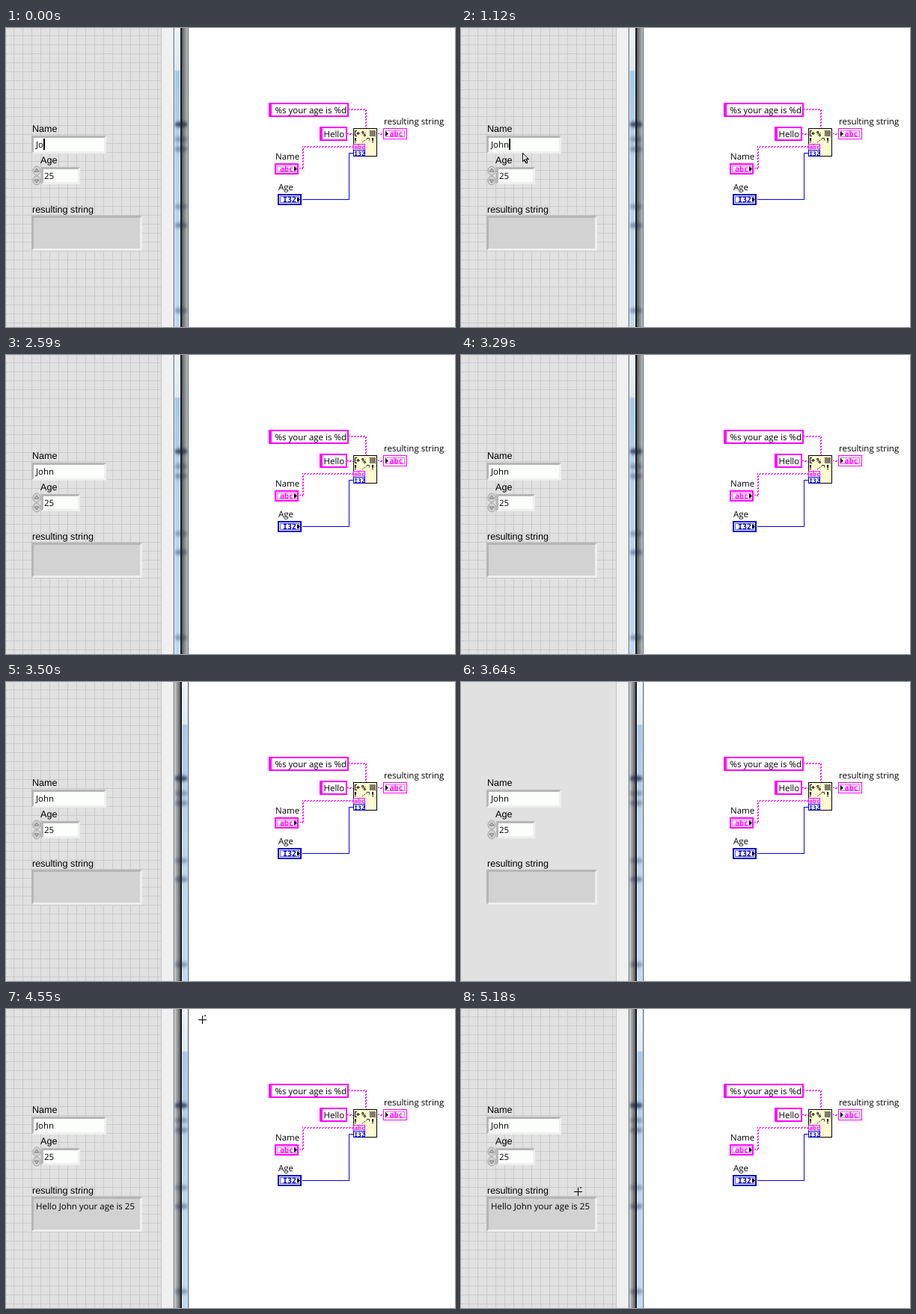
These frames come from a looping animation (600x400 px, 5880 ms). An HTML page:

```html
<!DOCTYPE html>
<html lang="en">
<head>
<meta charset="utf-8">
<title>Format into string</title>
<style>
html, body { margin: 0; width: 100%; height: 100%; overflow: hidden; background: #fff; }
svg { display: block; width: 600px; height: 400px; }
text { font: 11.5px "Open Sans", "Noto Sans", sans-serif; fill: #000; white-space: pre; text-rendering: geometricPrecision; }
.label { font: 12.6px "Liberation Sans", Arial, sans-serif; }
.type { font: bold 10px "DejaVu Sans Mono", monospace; }
.mini { font: bold 8px "DejaVu Sans Mono", monospace; }
.str { fill: #f0f; }
.int { fill: #0000c8; }
.crisp { shape-rendering: crispEdges; }
</style>
</head>
<body>
<svg id="stage" viewBox="0 0 600 400">
  <defs>
    <pattern id="grid" x="10" y="10" width="12" height="12" patternUnits="userSpaceOnUse">
      <path d="M0 .5H12M.5 0V12" stroke="#c9c9c9"/>
    </pattern>
    <linearGradient id="glass" x2="0" y2="1">
      <stop offset="0" stop-color="#eef4fa"/><stop offset=".14" stop-color="#dce8f3"/>
      <stop offset=".145" stop-color="#a6c8ea"/><stop offset=".5" stop-color="#b7d5f1"/>
      <stop offset="1" stop-color="#bfdaf4"/>
    </linearGradient>
    <linearGradient id="shadow">
      <stop offset="0" stop-opacity=".6"/><stop offset=".6" stop-opacity=".25"/><stop offset="1" stop-opacity="0"/>
    </linearGradient>
    <filter id="blur" x="-50%" y="-100%" width="200%" height="300%"><feGaussianBlur stdDeviation="1 2"/></filter>
    <clipPath id="frame"><rect x="225" y="0" width="18" height="400"/></clipPath>
  </defs>
  <rect width="600" height="400" fill="#fff"/>
  <g id="panel"></g>
  <g id="edge"></g>
  <g id="diagram"></g>
  <rect id="caret" class="crisp" width="2" height="15"/>
  <path id="arrow" class="crisp" d="M.5 .5V11.5L3 9.2 5 13.8 7 13 5 8.4H8.3Z" fill="#fff" stroke="#000" stroke-width="1.3"/>
  <path id="beam" class="crisp" d="M-3 .5H0M1 .5H4M.5 1V14M-3 14.5H0M1 14.5H4" stroke="#000"/>
  <g id="cross" class="crisp">
    <path d="M-5 .5H6M.5 -5V6" stroke="#000"/>
    <rect x="3" y="-6" width="2" height="2" fill="#555"/>
  </g>
</svg>
<script>
const LOOP = 5880;
const $ = id => document.getElementById(id);

const rect = (x, y, w, h, fill, extra = '') =>
  `<rect class="crisp" x="${x}" y="${y}" width="${w}" height="${h}" fill="${fill}" ${extra}/>`;
const text = (x, y, s, cls = '', id = '') =>
  `<text x="${x}" y="${y}" class="${cls}" id="${id}">${s}</text>`;
const path = (d, fill, stroke = 'none') => `<path d="${d}" fill="${fill}" stroke="${stroke}"/>`;

// Sunken control: dark upper left rim, light lower right rim
function field(x, y, w, h, fill) {
  return rect(x, y, w, h, '#efefef') +
    path(`M${x} ${y}h${w}l-3 3H${x + 3}V${y + h - 3}L${x} ${y + h}Z`, '#b6b6b6') +
    rect(x + 3, y + 3, w - 6, h - 6, fill);
}

function spinner(x, y) {
  const half = (top, tip) =>
    `<ellipse cx="${x + 6}" cy="${top + 6}" rx="5" ry="6" fill="#d2d2d2" stroke="#a2a2a2"/>` +
    path(`M${x + 3} ${top + 6 - tip}h6l-3 ${tip * 4}Z`, '#c4c4c4', '#777');
  return half(y, -1) + half(y + 13, 1);
}

function stringBox(x, y, w, h) {
  return rect(x, y, w, h, '#f0f') + rect(x + 4, y + 2, w - 6, h - 4, '#fff');
}

function terminal(x, y, color, thick, label, cls, out) {
  const w = 32, h = 15, p = out ? x + 3 : x + 26;
  return rect(x, y, w, h, color) + rect(x + thick, y + thick, w - 2 * thick, h - 2 * thick, '#fff') +
    rect(x + 3.5, y + 3.5, w - 7, h - 7, '#fff', `stroke="${color}" stroke-opacity=".65"`) +
    text(x + (out ? 8.5 : 7), y + 11, label, 'type ' + cls) +
    path(`M${p} ${y + 4}v7l4 -3.5Z`, '#000');
}

function stringWire(d) {
  return `<g class="crisp" fill="none" stroke="#f0f" stroke-dasharray="2 2"><path d="${d}"/>` +
    `<path d="${d}" stroke-dashoffset="2" transform="translate(1 1)"/></g>`;
}

function formatNode() {
  let dots = '';
  for (let i = 0; i < 32; i++) {
    dots += rect(486 + i % 4 * 2 + (i >> 2) % 2, 137 + (i >> 2), 1, 1, '#000');
  }
  const bang = x => rect(x, 147, 2, 4, '#000') + rect(x, 152, 2, 1, '#000');
  return rect(464.5, 134.5, 31, 37, '#fffbd0', 'stroke="#000"') +
    path('M469 137.5H466.5V144.5H469M468 141H473M470.5 139V143', 'none', '#000') +
    text(475, 145, '%', 'type') + dots + bang(466) + bang(489) +
    '<path d="M476 153l8 -6" stroke="#333" stroke-dasharray="2 1"/>' + path('M482 147.5h3.5v3', 'none', '#333') +
    rect(464.5, 155.5, 15, 8, '#fff', 'stroke="#f0f"') + text(465.3, 162, 'abc', 'mini str') +
    rect(464.5, 163.5, 15, 8, '#fff', 'stroke="#0000c8"') + text(465.3, 170.5, 'I32', 'mini int');
}

$('panel').innerHTML = rect(0, 0, 208, 400, '#e1e1e1') +
  '<rect id="lines" width="208" height="400" fill="url(#grid)"/>' +
  text(35, 139, 'Name', 'label') + text(46, 181, 'Age', 'label') + text(35, 247, 'resulting string', 'label') +
  field(34, 144, 100, 24, '#fbfefb') + field(47, 186, 52, 23, '#fbfefb') +
  field(34, 251, 148, 47, '#d2d2d2') + spinner(35, 185) +
  text(40, 160, '', '', 'name') + text(51, 202, '25') + text(40, 268, '', '', 'result') +
  rect(207, 0, 1, 400, '#c4c4c4') + rect(208, 0, 15, 400, '#f0f0f0');

// The active window has blue glass and drops its shadow on the other frame
const glass = x => rect(x, 0, 8, 400, 'url(#glass)') +
  rect(x, 0, 1, 400, '#fff', 'opacity=".55"') + rect(x + 7, 0, 1, 400, '#fff', 'opacity=".55"');

const smudges = [[129, .85], [149, .35], [162, .4], [239, .35], [264, .45], [378, .4]]
  .map(([y, o]) => `<ellipse cx="234" cy="${y}" rx="9" ry="3.5" fill="#1c2f4c" opacity="${o}" filter="url(#blur)"/>`)
  .join('');

$('edge').innerHTML = rect(223, 0, 1, 400, '#d8d8d8') +
  '<g id="before">' + rect(224, 0, 1, 400, '#707880') + glass(225) +
  rect(235, 0, 8, 400, '#e2e7ec') + rect(243, 0, 1, 400, '#8a8f94') +
  rect(235, 0, 11, 400, 'url(#shadow)') + '</g>' +
  '<g id="after">' + rect(224, 0, 1, 400, '#80858a') + rect(225, 0, 8, 400, '#e2e7ec') +
  `<g transform="matrix(-1 0 0 1 233 0)">${rect(0, 0, 9, 400, 'url(#shadow)')}</g>` +
  glass(235) + rect(243, 0, 1, 400, '#505860') + '</g>' +
  `<g clip-path="url(#frame)">${smudges}</g>` + rect(233, 0, 2, 400, '#1a1a1a');

$('diagram').innerHTML =
  stringWire('M458 108.5H480.5V134') + stringWire('M456 141.5H464') +
  stringWire('M392 187.5H396.5V158.5H464') + stringWire('M497 141.5H505') +
  '<path class="crisp" d="M396 229.5H458.5V167.5H464" fill="none" stroke="#00f"/>' +
  stringBox(351, 100, 107, 19) + text(359.5, 114, '%s your age is %d') +
  stringBox(419, 132, 37, 19) + text(424.5, 146, 'Hello') +
  text(360, 176, 'Name') + terminal(359, 181, '#f0f', 2, 'abc', 'str') +
  text(364, 217, 'Age') + terminal(363, 222, '#0000c8', 2, 'I32', 'int') +
  text(505, 129, 'resulting string') + terminal(504, 134, '#f0f', 1, 'abc', 'str', true) +
  formatNode();

// Pointer stops: [time, x, y]; a stop without a place hides the pointer
const arrowStops = [[1120, 82, 167], [1190, 79, 180], [1260], [1820, 73, 210], [1890, 77, 232],
  [1960, 81, 254], [2030, 84, 268], [2380, 98, 222], [2450, 118, 160], [2520, 133, 100], [2590]];
const beamStops = [[1260, 78, 193], [1470]];
const crossStops = [[4550, 262, 14], [4620, 258, 70], [4690, 248, 146], [4760, 234, 219],
  [4830, 220, 271], [4970, 203, 267], [5040, 183, 258], [5110, 166, 249], [5180, 156, 244]];
const caretStops = [[0, 50, 148], [210, 57, 148], [420, 64, 148], [1260], [1470, 62, 190],
  [2450], [2870, 62, 190], [3290]];

const show = (id, on) => $(id).setAttribute('visibility', on ? 'visible' : 'hidden');

function place(id, stops, t) {
  const stop = stops.filter(s => s[0] <= t).pop();
  const on = !!stop && stop.length > 1;
  show(id, on);
  if (on) $(id).setAttribute('transform', `translate(${stop[1]} ${stop[2]})`);
}

function draw(t) {
  $('name').textContent = 'John'.slice(0, t < 210 ? 2 : t < 420 ? 3 : 4);
  $('result').textContent = t < 3710 ? '' : 'Hello John your age is 25';
  show('lines', t < 3640 || t >= 3710);
  show('before', t < 3500);
  show('after', t >= 3500);
  place('caret', caretStops, t);
  place('arrow', arrowStops, t);
  place('beam', beamStops, t);
  place('cross', crossStops, t);
}

const start = performance.now();
function tick() {
  draw((performance.now() - start) % LOOP);
  requestAnimationFrame(tick);
}
draw(0);
requestAnimationFrame(tick);
</script>
</body>
</html>
```
